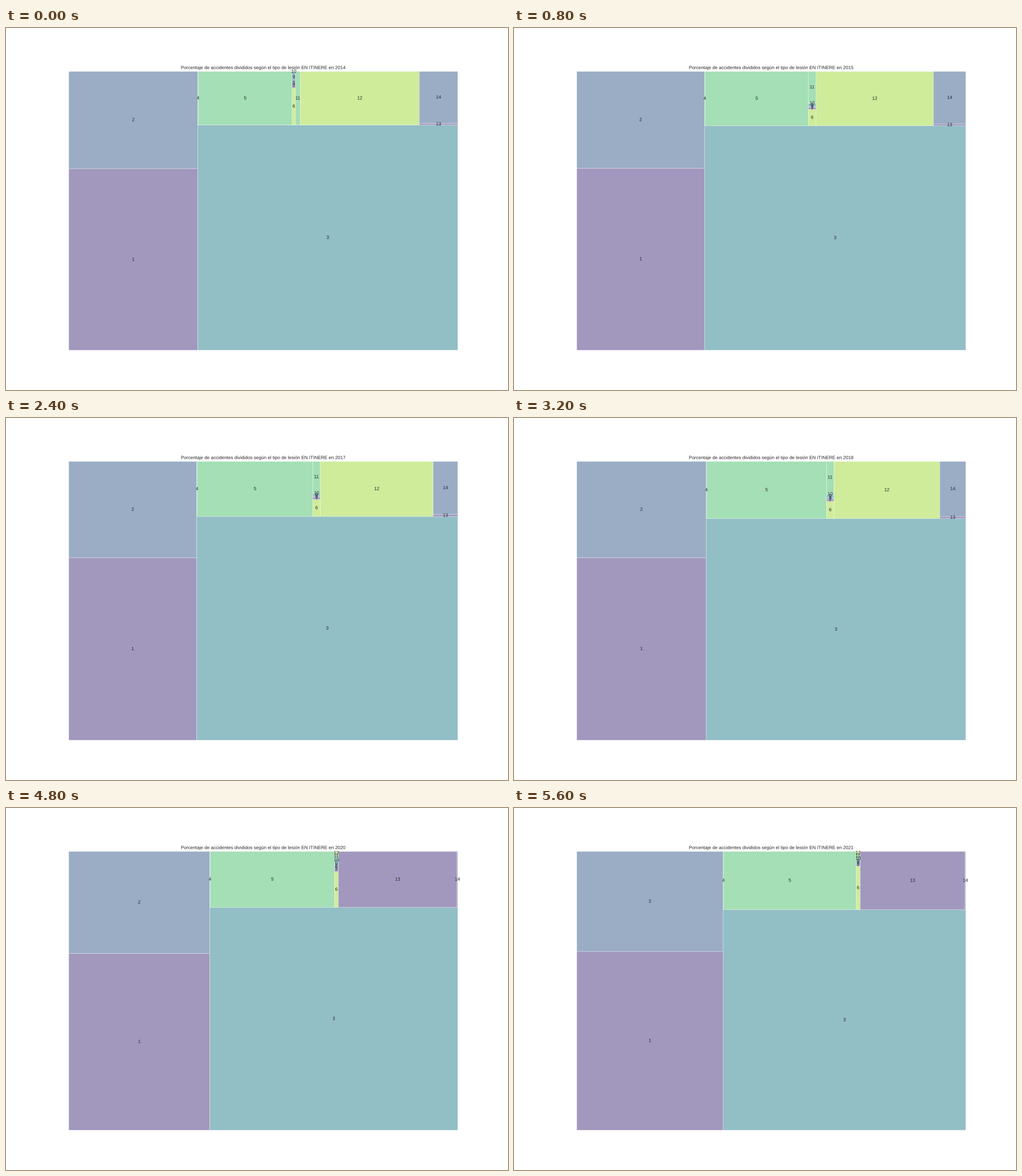
A matplotlib script that plays this animation: 881x636 px, repeating every 6.4 s.

```python
import numpy as np
import matplotlib.pyplot as plt
from matplotlib.animation import FuncAnimation
from matplotlib.patches import PathPatch, Rectangle
from matplotlib.textpath import TextPath
from matplotlib.transforms import Affine2D

W, H, DPI = 881, 636, 64
LEFT, RIGHT, TOP, BOTTOM = 0.125 * W, 0.9 * W, 0.12 * H, 0.89 * H
SCALE = W / 1800               # an 18 x 13 inch chart at 100 dpi, shown smaller
PX = SCALE * 100 / 72          # one chart point in pixels
SIZE = 12 * PX
COLORS = plt.cm.viridis(np.linspace(0, 1, 8)[1:-1])

plt.rcParams["font.family"] = "Liberation Sans"
fig = plt.figure(figsize=(W / DPI, H / DPI), dpi=DPI, facecolor="white")
ax = fig.add_axes([0, 0, 1, 1])


def trend(year, points):
    return np.interp(year, list(points), list(points.values()))


def shares(year):
    """Percentage of each of the 14 injury types, in order."""
    keys = [2014, 2016, 2017, 2018, 2019, 2020, 2021]
    one, two, three, five = (np.interp(year, keys, v) for v in (
        [21.60, 21.30, 21.53, 21.77, 22.16, 23.00, 24.13],
        [11.56, 11.24, 11.37, 11.49, 11.80, 13.25, 13.50],
        [53.98, 54.14, 53.85, 53.06, 52.32, 50.95, 49.33],
        [4.64, 5.71, 5.87, 6.32, 6.57, 6.41, 7.12]))
    out = [
        one, two, three, 0.025, five,
        trend(year, {2019: 0.117, 2020: 0.126, 2021: 0.163}),
        trend(year, {2020: 0.013, 2021: 0.0084}),
        trend(year, {2014: 0.004, 2019: 0.013, 2021: 0.005}),
        trend(year, {2014: 0.033, 2016: 0.013, 2019: 0.022, 2020: 0.010}),
        trend(year, {2014: 0.0013, 2020: 0.016, 2021: 0.0084}),
    ]
    if year < 2020:
        out += [trend(year, {2014: 0.24, 2016: 0.21, 2019: 0.22}),
                trend(year, {2016: 5.88, 2018: 5.576, 2019: 5.508}),
                trend(year, {2014: 0.063, 2016: 0.040, 2019: 0.056})]
        return out + [100 - sum(out)]
    out += [0.012, 0.011]
    return out + [100 - sum(out) - 0.042, 0.042]


def strip(sizes, x, y, w, h):
    """Stack sizes along the shorter side; return rectangles and the rest."""
    rects = []
    if w >= h:
        t, pos = sum(sizes) / h, y
        for s in sizes:
            rects.append((x, pos, t, s / t))
            pos += s / t
        return rects, (x + t, y, w - t, h)
    t, pos = sum(sizes) / w, x
    for s in sizes:
        rects.append((pos, y, s / t, t))
        pos += s / t
    return rects, (x, y + t, w, h - t)


def worst(sizes, space):
    return max(max(w / h, h / w) for _, _, w, h in strip(sizes, *space)[0])


def squarify(sizes):
    space, out = (0, 0, 100, 100), []
    while sizes:
        n = 1
        while (n < len(sizes)
               and worst(sizes[:n], space) >= worst(sizes[:n + 1], space)):
            n += 1
        rects, space = strip(sizes[:n], *space)
        out += rects
        sizes = sizes[n:]
    return out


def write(text, x, baseline, gauge=None):
    """Text centred on x, measured by a gauge text of equal width if given."""
    box = TextPath((0, 0), gauge or text, size=SIZE).get_extents()
    move = Affine2D().scale(1, -1).translate(x - (box.x0 + box.x1) / 2, baseline)
    path = TextPath((0, 0), text, size=SIZE).transformed(move)
    ax.add_patch(PathPatch(path, facecolor="0.15", linewidth=0, zorder=3))


def draw(i):
    ax.clear()
    ax.set(xlim=(0, W), ylim=(H, 0))
    ax.axis("off")
    year = 2014 + i
    kx, ky = (RIGHT - LEFT) / 100, (BOTTOM - TOP) / 100
    for k, (x, y, w, h) in enumerate(squarify([100 * s for s in shares(year)])):
        x, y, w, h = LEFT + x * kx, BOTTOM - (y + h) * ky, w * kx, h * ky
        ax.add_patch(Rectangle(
            (x, y), w, h, facecolor=COLORS[k % 6], edgecolor="white",
            linewidth=PX * 72 / DPI, alpha=0.5, snap=False))
        label = str(k + 1)
        write(label, x + w / 2, y + h / 2 + 0.26 * SIZE, "0" * len(label))
    write("Porcentaje de accidentes divididos según el tipo de lesión "
          f"EN ITINERE en {year}", (LEFT + RIGHT) / 2, TOP - 6 * PX)
    return []


anim = FuncAnimation(fig, draw, frames=8, interval=800,
                     init_func=lambda: [], repeat=True, repeat_delay=0)
plt.show()
```
